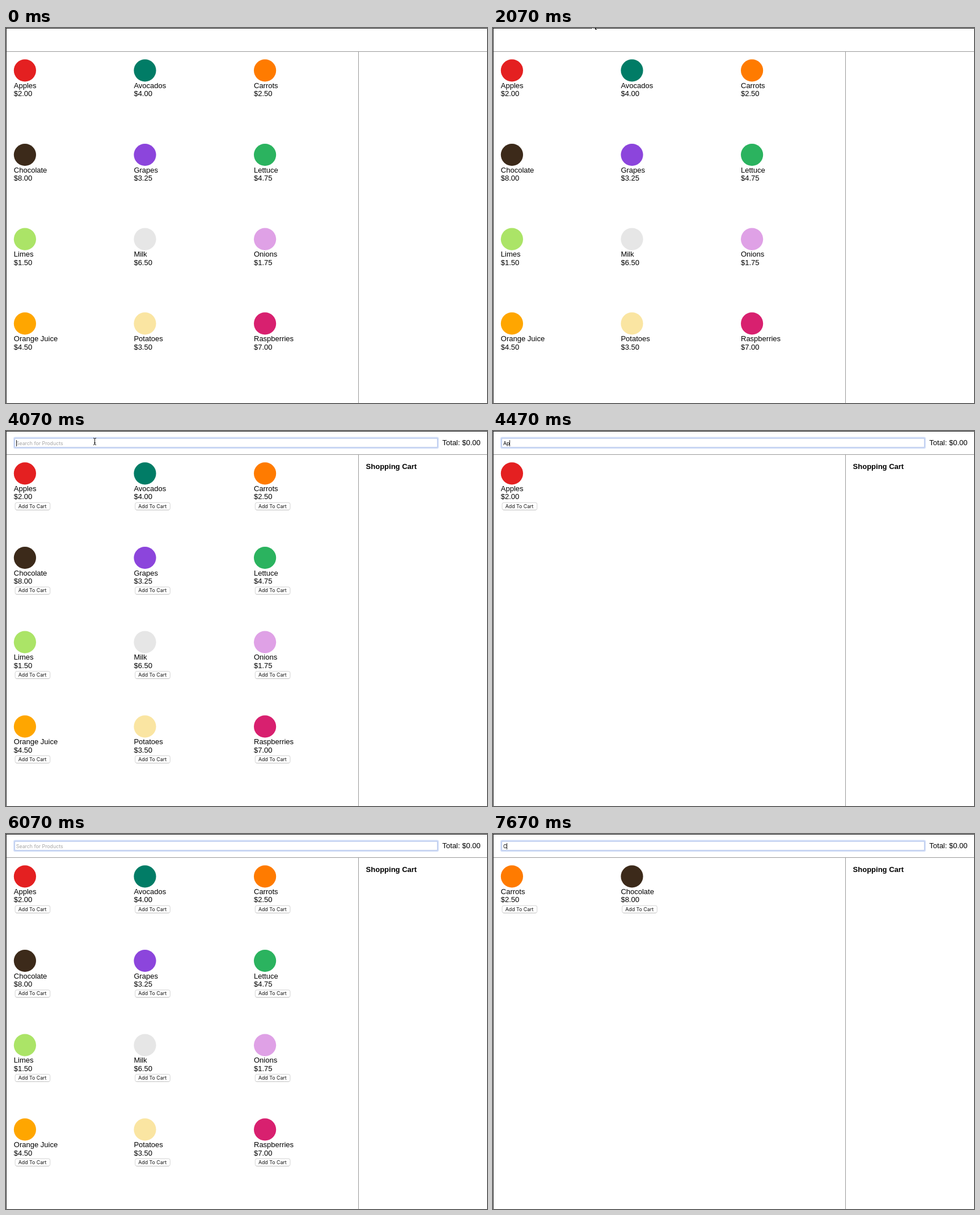
An HTML page with a canvas that plays this animation: 848x661 px, repeating every 8 s.

```html
<!DOCTYPE html>
<html lang="en">
<head>
<meta charset="utf-8">
<title>Shop</title>
<style>
  html, body { margin: 0; width: 100%; height: 100%; overflow: hidden; background: #fff; }
  canvas { display: block; }
</style>
</head>
<body>
<canvas id="stage" width="848" height="661"></canvas>
<script>
const ctx = document.getElementById('stage').getContext('2d');
const LOOP = 8000, STEP = 1000 / 15;
const BODY = '13px "Liberation Sans", Arial, sans-serif';
const CONTROL = '8.8px Inter, sans-serif';

const products = [
  ['Apples', '2.00', '#e42021'], ['Avocados', '4.00', '#017c66'], ['Carrots', '2.50', '#ff7b00'],
  ['Chocolate', '8.00', '#3c2a1a'], ['Grapes', '3.25', '#8c45dc'], ['Lettuce', '4.75', '#2bb35f'],
  ['Limes', '1.50', '#abe467'], ['Milk', '6.50', '#e6e6e6'], ['Onions', '1.75', '#dfa1e6'],
  ['Orange Juice', '4.50', '#ffa600'], ['Potatoes', '3.50', '#fae5a2'], ['Raspberries', '7.00', '#d8206f']
];

// Timeline in ms
const LOADED = 2270, FOCUSED = 3730, TYPING = 4130;
const edits = [
  [0, ''], [TYPING, 'A'], [4470, 'Ap'], [4600, 'App'], [5130, 'Ap'], [5330, 'A'], [5470, ''],
  [6330, 'C'], [6600, 'Ca'], [6800, 'Car'], [7470, 'Ca'], [7670, 'C']
];
const caretHidden = [[6000, 6330], [7270, 7470]];

function text(string, x, y, font = BODY, color = '#000') {
  ctx.font = font;
  ctx.fillStyle = color;
  ctx.fillText(string, x, y);
}

function rect(x, y, w, h, color) {
  ctx.fillStyle = color;
  ctx.fillRect(x, y, w, h);
}

function box(x, y, w, h, radius, color, lineWidth = 1) {
  ctx.beginPath();
  ctx.roundRect(x, y, w, h, radius);
  ctx.strokeStyle = color;
  ctx.lineWidth = lineWidth;
  ctx.stroke();
}

function button(x, y) {
  box(x, y + 0.5, 61.6, 13, 3, '#d2d2d2');
  rect(x + 2, y + 13.2, 57.6, 0.6, '#bdbdbd');
  text('Add To Cart', x + 5.6, y + 9.9, CONTROL, '#111');
}

function product([name, price, color], index, withButton) {
  const x = 13.8 + 211.6 * (index % 3);
  const y = 55.2 + 148.7 * Math.floor(index / 3);
  ctx.beginPath();
  ctx.arc(x + 19.6, y + 19.6, 19.6, 0, 2 * Math.PI);
  ctx.fillStyle = color;
  ctx.fill();
  text(name, x, y + 50.6);
  text('$' + price, x, y + 65.2);
  if (withButton) button(x + 2.3, y + 70.5);
}

function searchField(t, query) {
  const focused = t >= FOCUSED;
  if (focused) box(14.5, 12, 747, 17.8, 1.5, '#d3dff8', 3);
  box(15.5, 13, 745, 15.8, 0, focused ? '#b4c5ea' : '#d0d0d0');
  if (query) text(query, 18, 24.7, CONTROL);
  else text('Search for Products', 17.8, 24.7, CONTROL, '#a5a5a5');
  if (focused && !caretHidden.some(([from, to]) => t >= from && t < to)) {
    ctx.font = CONTROL;
    rect(Math.round(18 + ctx.measureText(query).width), 16, 1, 11, '#222');
  }
}

function arrow(x, y) {
  ctx.save();
  ctx.translate(x, y);
  ctx.scale(0.82, 0.82);
  const outline = new Path2D('M0 0V14L3.2 11L6 17.5L8.4 16.5L5.6 10.2H10Z');
  ctx.strokeStyle = '#fff';
  ctx.lineWidth = 2;
  ctx.stroke(outline);
  ctx.fillStyle = '#000';
  ctx.fill(outline);
  ctx.restore();
}

function textCursor(x, y) {
  ctx.strokeStyle = '#111';
  ctx.lineWidth = 1;
  ctx.stroke(new Path2D(`M${x - 2.5} ${y - 6}Q${x} ${y - 6} ${x} ${y - 4}V${y + 4}Q${x} ${y + 6} ${x - 2.5} ${y + 6}
    M${x + 2.5} ${y - 6}Q${x} ${y - 6} ${x} ${y - 4}M${x} ${y + 4}Q${x} ${y + 6} ${x + 2.5} ${y + 6}M${x - 1.5} ${y + 2.5}h3`));
}

function mouse(t) {
  if (t < 1530 || t >= TYPING) return;
  const tick = Math.floor((t + 5) / STEP);
  const progress = (from, to) => {
    const p = Math.min(1, Math.max(0, (tick - from) / (to - from)));
    return p * p * (3 - 2 * p);
  };
  const enter = progress(22, 31), descend = progress(49, 55);
  const x = 200 - 24 * enter - 19.5 * descend;
  const y = -16 + 5 * enter + 29.5 * descend;
  if (y > 11) textCursor(x, y);
  else arrow(x, y);
}

function draw(t) {
  const loaded = t >= LOADED;
  const query = edits.findLast(([time]) => t >= time)[1];
  rect(0, 0, 848, 661, '#fff');
  rect(0, 41, 848, 1, '#999');
  rect(621, 42, 1, 619, '#999');
  products.filter(([name]) => name.startsWith(query))
    .forEach((item, index) => product(item, index, loaded));
  if (loaded) {
    searchField(t, query);
    text('Total: $0.00', 769.3, 25.2);
    text('Shopping Cart', 634.6, 66.7, 'bold ' + BODY);
  }
  rect(0, 0, 1, 661, '#333');
  rect(0, 0, 848, 1, '#222');
  mouse(t);
}

const start = performance.now();
function frame() {
  draw((performance.now() - start) % LOOP);
  requestAnimationFrame(frame);
}
frame();
</script>
</body>
</html>
```
